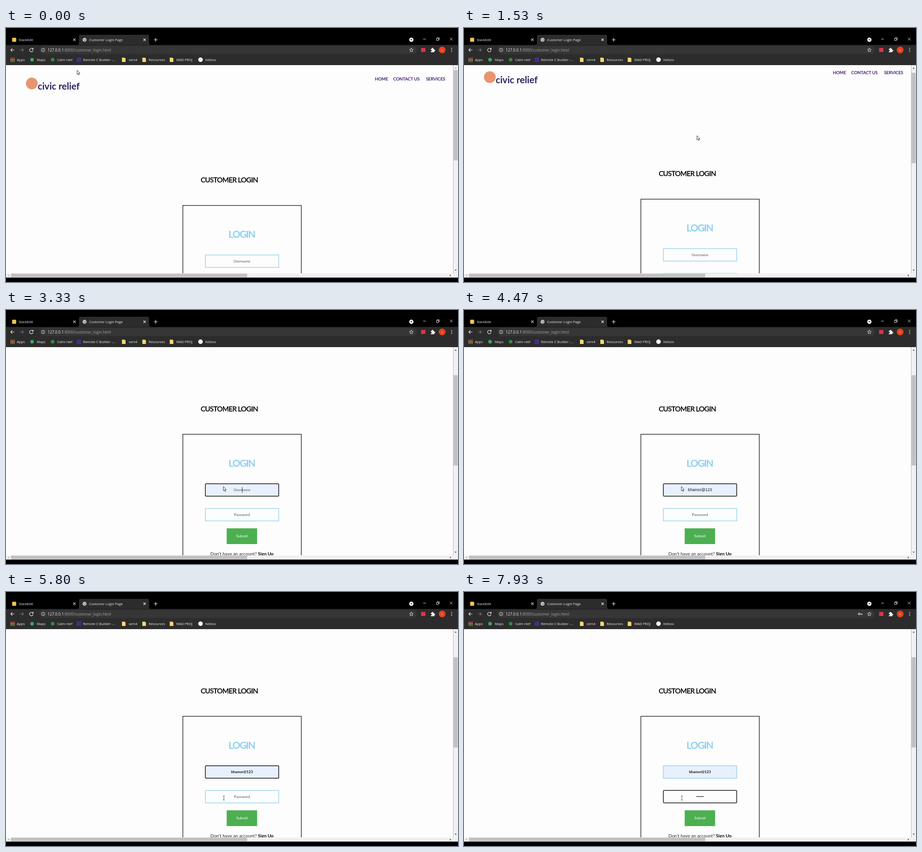
These frames come from a looping animation (998 px wide and 561 px high, 8000 ms). An HTML page:

```html
<!DOCTYPE html>
<html lang="en">
<head>
<meta charset="utf-8">
<title>Customer Login Page</title>
<style>
  html, body { margin: 0; width: 100%; height: 100%; overflow: hidden; background: #000; }
  svg { display: block; width: 100vw; height: 100vh; }
  .ui { font: 7.5px "Open Sans", "Noto Sans", sans-serif; fill: #eee; }
  .url { font-size: 8.4px; fill: #a4a4a4; }
  .page { font-family: Lato, "Open Sans", sans-serif; }
  .mid { text-anchor: middle; }
  .nav { font-size: 9.6px; letter-spacing: -.1px; font-weight: 500; fill: #3d1470; stroke: #3d1470; stroke-width: .2; }
  .head { font-size: 15.5px; letter-spacing: -.7px; font-weight: 500; stroke: #000; stroke-width: .3; }
  .login { font-size: 21px; letter-spacing: -1.2px; font-weight: 500; fill: #87cdf0; stroke: #87cdf0; stroke-width: .4; }
  .hint { font-size: 8.4px; fill: #555; }
  .line { fill: none; stroke: #eee; stroke-width: 1.2; }
</style>
</head>
<body>
<svg viewBox="0 0 998 561" xmlns="http://www.w3.org/2000/svg">
  <defs><clipPath id="view"><rect y="82" width="987.5" height="460"/></clipPath></defs>
  <rect width="998" height="561"/>

  <g id="chrome" class="ui">
    <path d="M157 37.5Q161 37.5 161 33V19Q161 15 165 15H312Q316 15 316 19V33Q316 37.5 320 37.5Z" fill="#2c2c2c"/>
    <rect y="37.5" width="998" height="44.5" fill="#2c2c2c"/>
    <rect x="74" y="39.5" width="833" height="18" rx="9" fill="#363636"/>
    <rect x="13.5" y="21.500" width="9" height="9" rx="1.500" fill="#f3c35a"/>
    <g class="line">
      <path d="M148.500 23.500l5 5m0-5l-5 5M303.500 23.500l5 5m0-5l-5 5M326.500 26h8m-4-4v8"/>
      <path d="M980 21.500l6 6m0-6l-6 6M921 24.500h6" stroke-width=".9"/>
      <path d="M950.500 23h4.500v4.500h-4.500zM952 23v-1.500h4.500v4.500h-1.500" stroke-width=".9"/>
      <path d="M18.500 48.500h-8m3.800-3.800l-3.800 3.800 3.800 3.800"/>
      <path d="M30.500 48.500h8m-3.800-3.800l3.800 3.800-3.800 3.800" stroke="#777"/>
      <path d="M59 46.200a3.900 3.900 0 1 0 .8 3.200M60 43.800v3h-3"/>
      <circle cx="82" cy="48.500" r="3.800" stroke-width=".9"/>
      <path d="M82 48v2.500M82 46v1" stroke-width=".9"/>
      <path id="star" stroke-width=".9"/>
    </g>
    <circle cx="173.500" cy="26" r="4.300" fill="#eee"/>
    <path d="M170 24.500l3 1.500-1 3M173 22.500l1 2 3 .5M177 27l-2.500 0-.5 2.500" fill="none" stroke="#444"/>
    <circle cx="895" cy="26" r="4.700" fill="#fff"/>
    <path d="M892.700 25h4.600l-2.300 2.600z" fill="#111"/>
    <rect x="916.500" y="44" width="9.500" height="9" rx="1" fill="#d8364a"/>
    <path d="M938 46h2.300a1.600 1.600 0 1 1 3 0h2.200v2.400a1.600 1.600 0 1 1 0 3v2.100h-7.500v-2.300a1.500 1.500 0 1 0 0-2.800z"/>
    <circle cx="963" cy="48.500" r="7.500" fill="#e8401c"/>
    <text x="963" y="51.200" class="mid">L</text>
    <g id="key"><circle cx="872.500" cy="48.500" r="1.900" class="line"/><path d="M874.500 47.900h5v2.600h-1.700v-1.300h-3.300z"/></g>
    <text x="28" y="28.700">StackEdit</text>
    <text x="183.500" y="28.700">Customer Login Page</text>
    <text x="92" y="51.700" class="url"><tspan fill="#eee">127.0.0.1</tspan>:8000/customer_login.html</text>
    <circle cx="57.500" cy="70" r="4" fill="#3fa65a"/>
    <circle cx="103" cy="70" r="4" fill="#2f8c3c"/>
    <rect x="156" y="65" width="10" height="10" fill="#4a2a88"/>
    <circle cx="429.500" cy="70" r="5" fill="#fff"/>
  </g>

  <g class="page" clip-path="url(#view)">
    <rect y="82" width="988" height="460" fill="#fdfdfd"/>
    <g id="scroll">
      <circle cx="57" cy="122.500" r="13" fill="#e8956f"/>
      <text x="70" y="135.500" font-size="20.500" font-weight="700" fill="#2f1f5f">civic relief</text>
      <g class="nav">
        <text x="814.500" y="116.200">HOME</text>
        <text x="855" y="116.200">CONTACT US</text>
        <text x="927.500" y="116.200">SERVICES</text>
      </g>
      <text x="493" y="341" class="head mid">CUSTOMER LOGIN</text>
      <rect x="390.500" y="392" width="261.500" height="300" fill="none" stroke="#111" stroke-width="1.300"/>
      <text x="520.500" y="463" class="login mid">LOGIN</text>
      <rect id="userBox" x="440.200" y="501.300" width="162" height="27.500"/>
      <text id="userText" x="521" y="517.500" class="mid"></text>
      <rect id="passBox" x="440.200" y="555.800" width="162" height="27.500"/>
      <text id="passHint" x="521" y="572" class="hint mid">Password</text>
      <g id="dots"></g>
      <rect id="caret" width=".9" height="13" fill="#222"/>
      <rect x="487.300" y="599.700" width="67.200" height="34.800" fill="#4caf50"/>
      <text x="521" y="619.300" class="mid" font-size="8.400" fill="#fff">Submit</text>
      <text x="521" y="659" class="mid" font-size="10" fill="#222">Don't have an account? <tspan font-weight="700" fill="#000">Sign Up</tspan></text>
    </g>
  </g>

  <g>
    <path d="M987.500 82H998V551.300H0V541.800H987.500Z" fill="#f1f1f1"/>
    <rect id="thumb" x="988.300" y="93" width="9" height="199.500" fill="#c1c1c1"/>
    <rect x="11" y="542.500" width="521.500" height="8" fill="#c1c1c1"/>
    <path id="upArrow" d="M990.500 89.700h4.600l-2.300-2.700z"/>
    <path d="M990.500 533.800h4.600l-2.300 2.700zM980 544.400v4.600l2.700-2.300z" fill="#505050"/>
    <path d="M6.800 544.400v4.600l-2.700-2.300z" fill="#a3a3a3"/>
  </g>

  <g id="cursor">
    <path id="arrow" d="M0 0V9.300L2 7.500 3.500 10.700 5 10 3.500 6.800H6.300Z" fill="#fff" stroke="#222" stroke-width=".9"/>
    <path id="beam" d="M-2-4.500H-.6L0-4 .6-4.500H2M0-4V4M-2 4.500H-.6L0 4 .6 4.500H2" fill="none" stroke="#444" stroke-width=".9"/>
  </g>
</svg>
<script>
const LOOP = 8000, SCROLL = 117.5;
const FOCUS_USER = 2170, TINT = 2930, PREVIEW = 4000, ACCEPT = 5300, FOCUS_PASS = 6130;
const KEYS = [6430, 6570, 6770, 6900, 7030, 7150, 7270, 7430];
// time, x, y
const PATH = [
  [30, 157, 93], [830, 519, 221], [1400, 519, 221], [2070, 473, 390],
  [2900, 473, 390], [3300, 480, 390], [4470, 480, 390], [5000, 480, 450],
  [5600, 480, 450], [5800, 481, 455]
];
const $ = id => document.getElementById(id);
const ease = p => p * p * (3 - 2 * p);
const phase = (t, a, b) => ease(Math.min(1, Math.max(0, (t - a) / (b - a))));
const show = (id, on) => $(id).setAttribute('visibility', on ? 'visible' : 'hidden');

function set(id, attrs) {
  for (const k in attrs) $(id).setAttribute(k, attrs[k]);
}

function add(parent, tag, attrs, text = '') {
  const el = document.createElementNS('http://www.w3.org/2000/svg', tag);
  for (const k in attrs) el.setAttribute(k, attrs[k]);
  el.textContent = text;
  return $(parent).appendChild(el);
}

function buildChrome() {
  [[24, 'Apps'], [68, 'Maps'], [113, 'Calm reef'], [170, 'Remote C Builder -...'], [271, 'sem4'],
   [315, 'Resourses'], [376, 'WAD PROJ'], [440, 'Kelbox']]
    .forEach(([x, label]) => add('chrome', 'text', { x, y: 72.5 }, label));
  for (const x of [256, 301, 361.500])
    add('chrome', 'path', { d: `M${x} 65.500h6l2 2v7.500h-8z`, fill: '#f7d774' });
  const colors = ['#e2574c', '#f2b632', '#4fa95b'];
  for (let i = 0; i < 9; i++)
    add('chrome', 'rect', { x: 10 + i % 3 * 3.4, y: 65.7 + Math.floor(i / 3) * 3.4, width: 2.3, height: 2.3, fill: colors[Math.floor(i / 3)] });
  for (const dy of [-3.5, 0, 3.5]) add('chrome', 'circle', { cx: 984, cy: 48.5 + dy, r: 1 });
  const star = [...Array(10).keys()].map(i => {
    const r = i % 2 ? 2 : 4.5, a = i * Math.PI / 5;
    return [895 + r * Math.sin(a), 48.7 - r * Math.cos(a)];
  });
  set('star', { d: `M${star.join('L')}Z` });
  KEYS.forEach(() => add('dots', 'circle', { cy: 569.2, r: .9, fill: '#111' }));
}

function cursorAt(t) {
  const i = PATH.findIndex(p => t < p[0]);
  if (i === 0) return PATH[0].slice(1);
  if (i < 0) return PATH[PATH.length - 1].slice(1);
  const [t0, x0, y0] = PATH[i - 1], [t1, x1, y1] = PATH[i], p = phase(t, t0, t1);
  return [x0 + (x1 - x0) * p, y0 + (y1 - y0) * p];
}

function styleField(id, focused, fill) {
  set(id, { stroke: focused ? '#111' : '#87c9e6', 'stroke-width': focused ? 1.5 : 1.2, rx: focused ? 2 : 0, fill });
}

function drawUser(t) {
  styleField('userBox', t >= FOCUS_USER && t < FOCUS_PASS, t >= TINT ? '#e8f0fe' : '#fdfdfd');
  const text = $('userText');
  text.textContent = t < PREVIEW ? 'Username' : 'bhamor@123';
  const accepted = t >= ACCEPT, preview = t >= PREVIEW && !accepted;
  text.style.font = preview ? '8.7px "Liberation Sans", Arial, sans-serif'
    : accepted ? '700 8px Lato, sans-serif' : '8.4px Lato, sans-serif';
  text.style.fill = t < PREVIEW ? '#555' : '#111';
}

function drawPassword(t, typed) {
  styleField('passBox', t >= FOCUS_PASS, '#fdfdfd');
  show('passHint', !typed);
  [...$('dots').children].forEach((dot, i) => {
    dot.setAttribute('cx', 521 + (i - (typed - 1) / 2) * 2.1);
    dot.setAttribute('visibility', i < typed ? 'visible' : 'hidden');
  });
}

function drawCaret(t, typed) {
  const inPass = t >= FOCUS_PASS;
  const since = typed ? KEYS[typed - 1] : inPass ? FOCUS_PASS : FOCUS_USER;
  const active = inPass || (t >= FOCUS_USER && t < PREVIEW);
  show('caret', active && (t - since) % 1000 < 500);
  set('caret', { x: 521 + typed * 1.05, y: inPass ? 563 : 508.5 });
}

function draw(t) {
  const s = phase(t, 1430, 1900);
  const typed = KEYS.filter(k => t >= k).length;
  set('scroll', { transform: `translate(0 ${-SCROLL * s})` });
  set('thumb', { y: 93 + 51 * s });
  set('upArrow', { fill: s > 0 ? '#505050' : '#a3a3a3' });
  drawUser(t);
  drawPassword(t, typed);
  drawCaret(t, typed);
  show('key', t >= FOCUS_PASS);
  const beam = (t >= 2030 && t < TINT) || t >= 5650;
  show('beam', beam);
  show('arrow', !beam);
  set('cursor', { transform: `translate(${cursorAt(t)})` });
}

buildChrome();
const start = performance.now();
(function tick() {
  draw((performance.now() - start) % LOOP);
  requestAnimationFrame(tick);
})();
</script>
</body>
</html>
```
